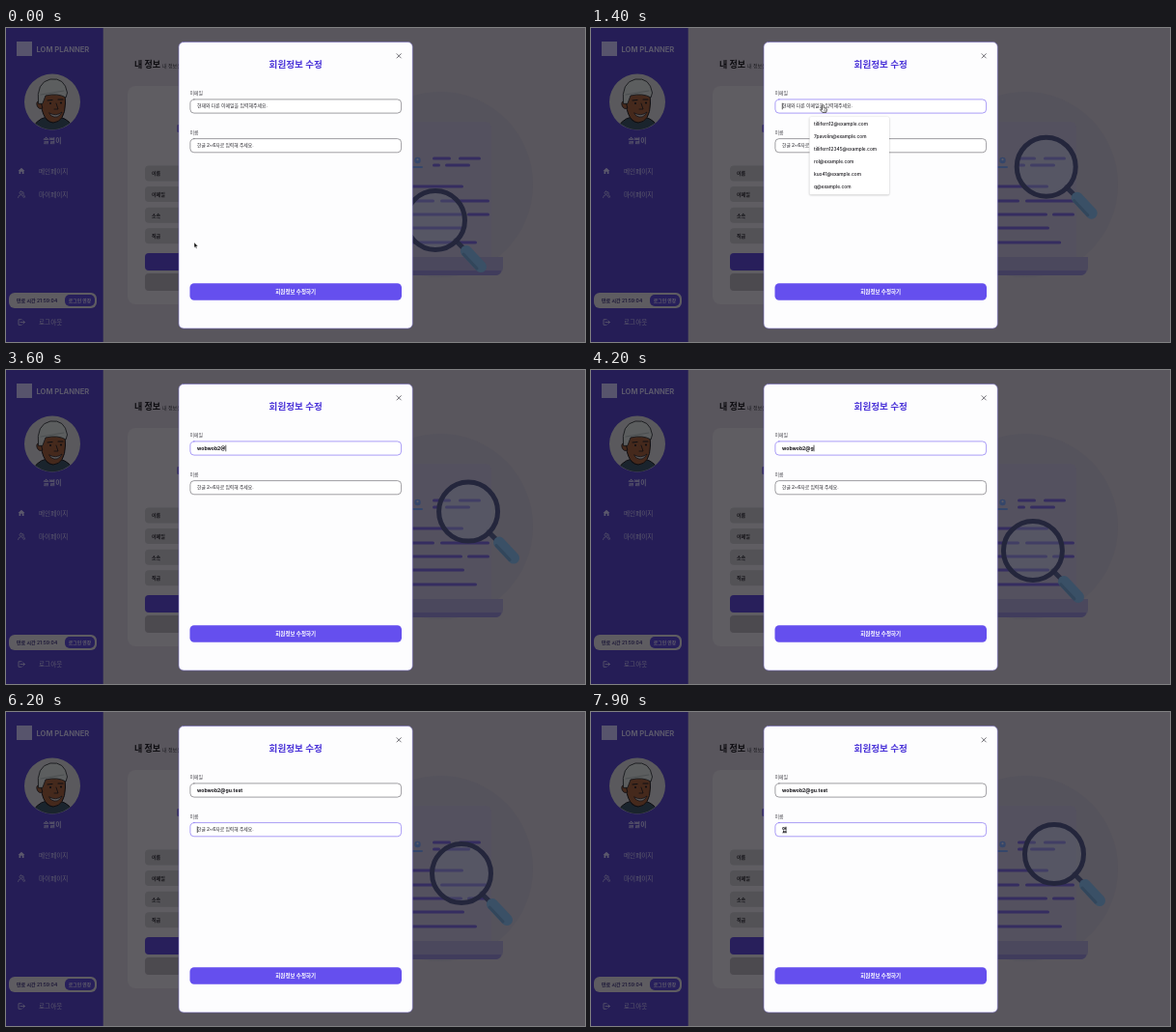
Write an HTML page with a canvas that moves like this. It is 600x325 px and loops after 8 s.

```html
<!DOCTYPE html>
<html lang="ko">
<head>
<meta charset="utf-8">
<style>
html, body { margin: 0; width: 600px; height: 325px; overflow: hidden; background: #59565d; }
canvas { display: block; width: 600px; height: 325px; }
</style>
</head>
<body>
<canvas id="stage"></canvas>
<script>
const LOOP = 8000;
const SEARCH = 2145;
const FONT = 'Inter, "Noto Sans CJK KR", "Noto Sans CJK", sans-serif';
const canvas = document.getElementById('stage');
const ctx = canvas.getContext('2d');
const ratio = Math.max(1, window.devicePixelRatio || 1);
canvas.width = 600 * ratio;
canvas.height = 325 * ratio;

const clamp = v => Math.max(0, Math.min(1, v));
const ease = v => { v = clamp(v); return v * v * (3 - 2 * v); };

function box(x, y, w, h, r, fill, stroke, line = 1) {
  ctx.beginPath();
  ctx.roundRect(x, y, w, h, r);
  if (fill) { ctx.fillStyle = fill; ctx.fill(); }
  if (stroke) { ctx.strokeStyle = stroke; ctx.lineWidth = line; ctx.stroke(); }
}

function disc(x, y, r, fill) {
  ctx.beginPath();
  ctx.arc(x, y, r, 0, Math.PI * 2);
  ctx.fillStyle = fill;
  ctx.fill();
}

function shape(path, fill, stroke, line = 1) {
  const p = new Path2D(path);
  if (fill) { ctx.fillStyle = fill; ctx.fill(p); }
  if (stroke) { ctx.strokeStyle = stroke; ctx.lineWidth = line; ctx.stroke(p); }
}

function stroke(x1, y1, x2, y2, color, width, cap = 'round') {
  ctx.beginPath();
  ctx.moveTo(x1, y1);
  ctx.lineTo(x2, y2);
  ctx.strokeStyle = color;
  ctx.lineWidth = width;
  ctx.lineCap = cap;
  ctx.stroke();
}

function text(str, x, y, size, color, weight = 400, align = 'left') {
  ctx.font = `${weight} ${size}px ${FONT}`;
  ctx.textAlign = align;
  ctx.textBaseline = 'alphabetic';
  ctx.fillStyle = color;
  ctx.fillText(str, x, y + size * 0.36);
  return ctx.measureText(str).width;
}

// Smooth path through [time, x, y] points.
function along(points, t) {
  const n = points.length - 1;
  if (t <= points[0][0]) return points[0].slice(1);
  if (t >= points[n][0]) return points[n].slice(1);
  const i = points.findIndex((p, k) => k < n && t < points[k + 1][0]);
  const a = points[i], b = points[i + 1], d = b[0] - a[0], u = (t - a[0]) / d;
  const slope = (k, c) => {
    const p = points[Math.max(0, k - 1)], q = points[Math.min(n, k + 1)];
    return (q[c] - p[c]) / (q[0] - p[0]);
  };
  return [1, 2].map(c =>
    a[c] * (1 + 2 * u) * (1 - u) ** 2 + b[c] * u * u * (3 - 2 * u) +
    d * (slope(i, c) * u * (1 - u) ** 2 - slope(i + 1, c) * u * u * (1 - u)));
}

function drawAvatar() {
  const skin = '#45291c', line = '#0f0e12';
  ctx.save();
  disc(48, 76.5, 29, '#5a595d');
  ctx.beginPath();
  ctx.arc(48, 76.5, 28.7, 0, Math.PI * 2);
  ctx.clip();
  shape('M27 106 Q30 95 42 92 L55 92 Q68 95 70 106Z', '#1a242d', line, 1);
  shape('M42 84 L42 95 Q49 101 55 94 L55 84Z', '#3a2319', line, .8);
  shape('M36 67 Q35 96 49 98 Q61 97 61.5 78 L61 65Z', skin, line, 1);
  shape('M36 77 Q31 74 32 80 Q34 85 37.5 83Z', skin, line, .8);
  shape('M33.5 78 Q31 56 46 53 Q61 51 63.5 67 L62 72 Q54 67 41 70 L38 78Z', '#5c5e5f', '#18191c', .9);
  stroke(36, 69, 60, 65, '#44484a', .7);
  stroke(43, 75, 48, 74.5, line, 1.1);
  stroke(54, 74, 59, 74, line, 1.1);
  disc(46, 78, 1.1, line);
  disc(57, 77.5, 1.1, line);
  shape('M52 78 L54 84 L50 84', null, line, .8);
  shape('M45 88 Q52 92 58 87 Q54 95 47 91Z', '#575556', line, .7);
  ctx.restore();
}

function drawSidebar() {
  const ink = '#5b586c';
  box(0, 0, 100.7, 325, 0, '#251d56');
  box(11, 14, 16, 15, 0, '#57546c');
  text('LOM PLANNER', 31.5, 22, 7.6, ink, 700);
  drawAvatar();
  text('솔별이', 48, 116.5, 6.8, ink, 700, 'center');
  shape('M12.5 148 L16 144.7 L19.5 148 L18.5 148 L18.5 151 L16.8 151 L16.8 148.8 L15.2 148.8 L15.2 151 L13.5 151 L13.5 148Z', ink);
  text('메인페이지', 34, 148.3, 6.6, ink, 500);
  ctx.lineCap = 'round';
  shape('M12.5 175.5 Q13 172.7 15.5 172.7 Q18 172.7 18.4 175.5 M17.4 169.5 Q19.4 170.5 17.8 172.2 Q19.5 173 19.7 175', null, ink, .7);
  shape('M15.5 169 A1.5 1.5 0 1 0 15.51 169', null, ink, .7);
  text('마이페이지', 34, 172.5, 6.6, ink, 500);
  box(3, 274, 91, 16, 6, '#5e5c61');
  text('만료 시간 21:59:04', 11, 282, 5, '#1d1838', 600);
  box(61, 276, 31, 12, 5, '#271f5b');
  text('로그인 연장', 76.5, 282, 4.8, '#625f6c', 600, 'center');
  shape('M16 301.7 L13 301.7 L13 307.3 L16 307.3 M15 304.5 L19.3 304.5 M17.7 302.8 L19.4 304.5 L17.7 306.2', null, ink, .8);
  text('로그아웃', 34, 304.7, 6.6, ink, 500);
}

function drawPage() {
  box(0, 0, 600, 325, 0, '#59565d');
  text('내 정보', 133, 37.5, 9, '#0d0c10', 700);
  text('내 정보를 확인', 162, 39.5, 5, '#1c1b20');
  box(126, 60, 120, 226, 8, '#5f5d62');
  box(177.5, 100, 10, 8, 1, '#281f5b');
  ['이름', '이메일', '소속', '직급'].forEach((label, i) => {
    const y = 150.5 + i * 21.6;
    box(144, y - 8, 80, 16, 4, '#535256');
    text(label, 151, y, 5, '#121116', 600);
  });
  box(144, 233, 80, 18, 4, '#281f5b');
  box(144, 254, 80, 18, 4, '#4c4a4f');
}

// [left, right, y, delay]
const RULES = [
  [442, 461, 135, 0], [469, 492, 135, 70], [442, 450, 142, 60], [455, 481, 142, 100],
  [400, 474, 164, 140], [400, 444, 179, 190], [450, 501, 179, 230],
  [400, 473, 193, 260], [478, 501, 193, 300], [400, 475, 207, 320], [400, 488, 222, 370]
];
const LENS_PATH = [
  [540, 345, 138], [700, 422, 137], [870, 465, 142], [970, 480, 147], [1100, 485, 150],
  [1415, 472, 167], [1650, 445, 199], [1780, 412, 204], [1890, 350, 202]
];

function drawSearch(t) {
  const p = (t + 1650) % SEARCH;
  disc(450, 162, 96, '#55535c');
  box(380, 97, 123, 146, 6, '#54515f');
  box(380, 237, 135, 19, [0, 0, 8, 8], '#4b485d');
  box(380, 251, 133, 5, [0, 0, 5, 5], '#403c5c');
  const icon = '#35466a';
  disc(426.5, 137, 3.2, icon);
  disc(426.5, 136.2, 1.1, '#5a5a68');
  stroke(418, 144, 431, 144, icon, 1.8);
  ctx.save();
  ctx.globalAlpha = 1 - clamp((p - 1950) / 90);
  for (const [left, right, y, delay] of RULES) {
    const k = ease((p - 290 - delay) / 260);
    if (k > 0) stroke(left + 1.5, y, left + 1.5 + (right - left - 3) * k, y, '#352d60', 3);
  }
  ctx.restore();
  const [x, y] = along(LENS_PATH, p);
  stroke(x + 21, y + 21, x + 31, y + 31, '#272b40', 5);
  stroke(x + 32, y + 32, x + 47, y + 48, '#3a5066', 12);
  stroke(x + 29, y + 35, x + 43, y + 50, '#32465b', 3);
  ctx.beginPath();
  ctx.arc(x, y, 30.5, 0, Math.PI * 2);
  ctx.fillStyle = 'rgba(92,96,108,.32)';
  ctx.fill();
  ctx.strokeStyle = '#24263c';
  ctx.lineWidth = 5;
  ctx.stroke();
}

const ADDRESS = 'wobwob2@gu.test';
const KEYS = [1900, 2000, 2120, 2250, 2380, 2560, 3050, 3500, 4150, 4280, 4450, 4720, 4950, 5110, 5250];
const EMAIL_FOCUS = 1000, NAME_FOCUS = 5700;
const RECENT = ['tillifern12@example.com', '7pavolin@example.com', 'tillifern12345@example.com',
  'rol@example.com', 'kuo41@example.com', 'q@example.com'];
const MATCHES = ['wobwob', 'wobwob@gu.test'];

function drawField(label, y, focused) {
  text(label, 190.5, y - 13.6, 4.9, '#46454c', 500);
  box(190.9, y - 7.1, 218.7, 14.2, 4, '#fff', focused ? '#7d6af2' : '#6c6b72', .65);
}

function drawCaret(x, y) {
  stroke(x, y - 3.3, x, y + 3.3, '#17161b', .7, 'butt');
}

function drawMenu(items, width) {
  const h = items.length * 13 + 2.5;
  ctx.save();
  ctx.shadowColor = 'rgba(0,0,0,.3)';
  ctx.shadowBlur = 2 * ratio;
  ctx.shadowOffsetY = ratio * .6;
  box(226.5, 92, width, h, 1.5, '#fff');
  ctx.restore();
  items.forEach((item, i) => text(item, 231, 99.5 + i * 13, 4.8, '#18171c', 500));
}

function drawForm(t) {
  box(179, 14.5, 242.3, 296.5, 5, '#fdfdfe', '#6f66b8', .6);
  text('회원정보 수정', 300.2, 37.2, 9.6, '#4a33d8', 700, 'center');
  stroke(405, 26.7, 409.3, 31, '#55545b', .8);
  stroke(409.3, 26.7, 405, 31, '#55545b', .8);

  const onName = t >= NAME_FOCUS;
  const onEmail = t >= EMAIL_FOCUS && !onName;
  const typed = KEYS.filter(k => k <= t).length;

  drawField('이메일', 81, onEmail);
  let width = 0;
  if (typed) width = text(ADDRESS.slice(0, typed), 198, 81, 5.1, '#111015', 700);
  else text('현재와 다른 이메일을 입력해주세요.', 198, 80.7, 4.9, '#2b2a30', 500);
  if (onEmail) {
    const since = t - (typed ? KEYS[typed - 1] : EMAIL_FOCUS);
    if (since % 1000 < 500) drawCaret(198.3 + width, 81);
  }

  drawField('이름', 121.7, onName);
  const syllable = t >= 7700 ? '앱' : t >= 7450 ? '애' : t >= 7200 ? 'ㅇ' : '';
  if (syllable) {
    const w = text(syllable, 198, 121.7, 5.4, '#111015', 700);
    stroke(198, 124.9, 198 + w, 124.9, '#28272d', .5, 'butt');
  } else {
    text('한글 2~6자로 입력해 주세요.', 198, 121.4, 4.8, '#2b2a30', 500);
    if (onName && (t < 6250 || t >= 6690)) drawCaret(198.3, 121.7);
  }

  box(190.5, 264.3, 219.5, 17.5, 4.5, '#654fee');
  text('회원정보 수정하기', 300.2, 272.8, 5.5, '#fff', 700, 'center');

  if (t >= 1200 && !typed) drawMenu(RECENT, 82.5);
  else if (typed && typed < 7) drawMenu(MATCHES, 56.5);
}

function drawPointer(t) {
  if (t >= KEYS[0]) return;
  const k = ease((t - 100) / 800);
  const x = 195 + 45.5 * k, y = 222 - 142 * k;
  ctx.save();
  ctx.translate(x, y);
  ctx.lineJoin = 'round';
  if (y < 88) {
    shape('M-1 0 Q0 -1 .8 0 L.8 2.7 L3.2 3.2 Q4 3.5 3.9 4.6 L3.2 7.4 L-.7 7.4 L-3 4.6 Q-2.8 3.5 -1 4.6Z', '#fff', '#111', .7);
    stroke(1.2, 4.5, 1.2, 6.2, '#333', .4);
    stroke(2.4, 4.5, 2.4, 6.2, '#333', .4);
  } else {
    shape('M0 0 L0 5.4 L1.2 4.3 L2 6.2 L3 5.8 L2.2 3.9 L3.9 3.9Z', '#111', '#fff', .4);
  }
  ctx.restore();
}

function draw(now) {
  const t = now % LOOP;
  ctx.setTransform(ratio, 0, 0, ratio, 0, 0);
  drawPage();
  drawSearch(t);
  drawSidebar();
  drawForm(t);
  drawPointer(t);
}

let start;
function tick(now) {
  start ??= now;
  draw(Math.max(0, now - start));
  requestAnimationFrame(tick);
}
draw(0);
requestAnimationFrame(tick);
</script>
</body>
</html>
```
